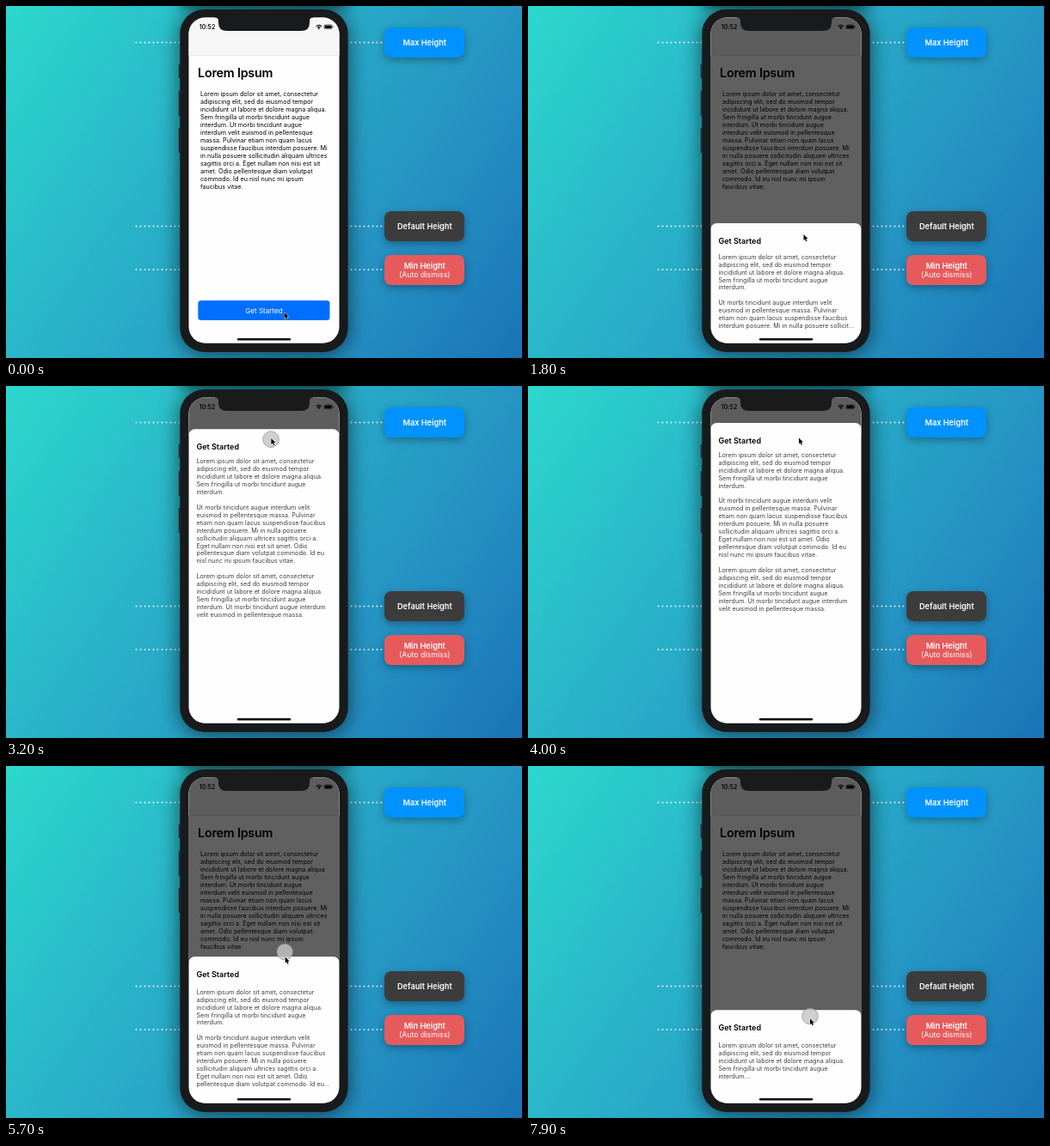
An HTML page with a canvas that plays this animation: 600x410 px, repeating every 8000 ms.

```html
<!DOCTYPE html>
<html lang="en">
<head>
<meta charset="utf-8">
<title>Bottom sheet demo</title>
<style>
  html, body { margin: 0; width: 100%; height: 100%; overflow: hidden; background: #26aec8; }
  canvas { display: block; width: 600px; height: 410px; }
</style>
</head>
<body>
<canvas id="stage"></canvas>
<script>
const W = 600, H = 410, LOOP = 8000;
const canvas = document.getElementById('stage');
const ctx = canvas.getContext('2d');
const dpr = window.devicePixelRatio || 1;
canvas.width = W * dpr;
canvas.height = H * dpr;

const SANS = 'Inter, Roboto, sans-serif';
const BODY = '7.2px ' + SANS;
const LINE = 8.95;
const SCREEN = { x: 212.5, y: 13.5, w: 175, h: 379.3, r: 19 };
const REST = 253;

const INTRO = `Lorem ipsum dolor sit amet, consectetur
adipiscing elit, sed do eiusmod tempor
incididunt ut labore et dolore magna aliqua.
Sem fringilla ut morbi tincidunt augue`.split('\n');

const PAGE = INTRO.concat(`interdum. Ut morbi tincidunt augue
interdum velit euismod in pellentesque
massa. Pulvinar etiam non quam lacus
suspendisse faucibus interdum posuere. Mi
in nulla posuere sollicitudin aliquam ultrices
sagittis orci a. Eget nullam non nisi est sit
amet. Odio pellentesque diam volutpat
commodo. Id eu nisl nunc mi ipsum
faucibus vitae.`.split('\n'));

const SHEET = INTRO.concat(`interdum.

Ut morbi tincidunt augue interdum velit
euismod in pellentesque massa. Pulvinar
etiam non quam lacus suspendisse faucibus
interdum posuere. Mi in nulla posuere
sollicitudin aliquam ultrices sagittis orci a.
Eget nullam non nisi est sit amet. Odio
pellentesque diam volutpat commodo. Id eu
nisl nunc mi ipsum faucibus vitae.
`.split('\n'), INTRO, `interdum. Ut morbi tincidunt augue interdum
velit euismod in pellentesque massa.`.split('\n'));

// Keyframes: [time, value], eased between neighbours.
const TOP = [[350, 412], [800, REST], [2371, REST], [3306, 43], [4980, 43], [5932, REST], [7500, REST], [8100, 295]];
const CURSOR_X = [[700, 323.5], [1500, 320.5], [2290, 320.5], [2800, 305.5], [3900, 315], [4900, 315], [5200, 317.5], [5970, 327.5], [7500, 327.5], [7900, 328]];
const CURSOR_Y = [[700, 357], [1500, 266], [2290, 266], [3225, 60.5], [4980, 60.5], [5970, 258.5], [7500, 258.5], [8100, 306.5]];
const DIM = [[350, 0], [800, 0.62]];
const PRESSES = [[150, 380], [2150, 3260], [4800, 5980], [7350, 8000]];

function at(keys, t) {
  if (t <= keys[0][0]) return keys[0][1];
  for (let i = 1; i < keys.length; i++) {
    const [t0, a] = keys[i - 1], [t1, b] = keys[i];
    if (t < t1) {
      const u = (t - t0) / (t1 - t0);
      return a + (b - a) * u * u * (3 - 2 * u);
    }
  }
  return keys[keys.length - 1][1];
}

function box(x, y, w, h, r, fill) {
  ctx.beginPath();
  ctx.roundRect(x, y, w, h, r);
  ctx.fillStyle = fill;
  ctx.fill();
}

function text(str, x, y, font, color, align = 'left', spacing = 0) {
  ctx.font = font;
  ctx.fillStyle = color;
  ctx.textAlign = align;
  ctx.letterSpacing = spacing + 'px';
  ctx.fillText(str, x, y);
  ctx.letterSpacing = '0px';
}

function shadow(color, blur, dy) {
  ctx.shadowColor = color;
  ctx.shadowBlur = blur * dpr;
  ctx.shadowOffsetY = dy * dpr;
}

function background() {
  const g = ctx.createLinearGradient(0, 0, W, H);
  g.addColorStop(0, '#2cd8cd');
  g.addColorStop(0.35, '#29b4c9');
  g.addColorStop(0.7, '#2594c4');
  g.addColorStop(1, '#1a74b6');
  ctx.fillStyle = g;
  ctx.fillRect(0, 0, W, H);
  ctx.fillStyle = 'rgba(255,255,255,0.9)';
  for (const y of [42.5, 256.5, 307]) {
    for (let x = 151.5; x < 438; x += 5) {
      ctx.beginPath();
      ctx.arc(x, y, 0.95, 0, 7);
      ctx.fill();
    }
  }
}

function labels() {
  const bold = '600 9.2px ' + SANS;
  for (const [y, color] of [[25, '#0092ff'], [239, '#3d3c3d'], [290, '#e75a5b']]) {
    ctx.save();
    shadow('rgba(0,0,0,0.32)', 10, 3);
    box(440, y, 93, 35, 8, color);
    ctx.restore();
  }
  text('Max Height', 486.7, 46, bold, '#fff', 'center');
  text('Default Height', 486.8, 260, bold, '#fff', 'center');
  text('Min Height', 486.7, 305.7, bold, '#fff', 'center');
  text('(Auto dismiss)', 486.8, 316.3, '8.8px ' + SANS, '#fff', 'center');
}

function phoneBody() {
  ctx.save();
  shadow('rgba(0,0,0,0.75)', 18, 2);
  box(202, -30, 196, 29, 12, '#181a1c');
  shadow('rgba(0,0,0,0.6)', 24, 3);
  box(202.3, 4, 195.3, 399, 28, '#181a1c');
  ctx.restore();
  for (const [y, h] of [[68, 16], [99, 29], [142, 29]])
    box(200.8, y, 1.8, h, 0.8, '#22282d');
}

function statusBar() {
  text('10:52', 224.8, 27, '600 7px ' + SANS, '#111');
  ctx.strokeStyle = '#111';
  ctx.lineWidth = 1.1;
  for (const r of [2.4, 4.4]) {
    ctx.beginPath();
    ctx.arc(363.8, 26.8, r, -Math.PI * 0.76, -Math.PI * 0.24);
    ctx.stroke();
  }
  ctx.beginPath();
  ctx.arc(363.8, 26.2, 0.9, 0, 7);
  ctx.fill();
  ctx.lineWidth = 0.5;
  ctx.beginPath();
  ctx.roundRect(369.8, 21.9, 9.6, 4.8, 1.4);
  ctx.stroke();
  box(370.5, 22.6, 8.2, 3.4, 0.8, '#111');
  box(379.9, 23.6, 0.7, 1.5, 0.3, '#111');
}

function page() {
  ctx.fillStyle = '#fefefe';
  ctx.fillRect(212, 13, 176, 380);
  ctx.fillStyle = '#f6f6f7';
  ctx.fillRect(212, 13, 176, 44.5);
  ctx.fillStyle = '#dededf';
  ctx.fillRect(212, 57.2, 176, 0.6);
  statusBar();
  text('Lorem Ipsum', 223, 83.2, '600 14.3px ' + SANS, '#000', 'left', -0.2);
  PAGE.forEach((s, i) => text(s, 226, 105 + i * 8.97, BODY, '#000'));
  box(223.3, 343, 153.2, 23, 3.5, '#006fff');
  text('Get Started', 300, 357.6, '8.1px ' + SANS, '#fff', 'center');
}

function truncate(n) {
  const lines = SHEET.slice(0, n);
  if (n >= SHEET.length) return lines;
  if (!lines[n - 1]) lines.pop();
  const last = lines.length - 1;
  const next = SHEET[last + 1];
  ctx.font = BODY;
  let s = lines[last] + (next ? ' ' + next : '');
  while (ctx.measureText(s + '…').width > 159) s = s.slice(0, -1);
  lines[last] = s.trimEnd() + '…';
  return lines;
}

function sheet(top, t) {
  // While being presented the sheet keeps its resting layout.
  const room = 379 - 32.6 - (t < 1000 ? REST : top);
  const n = Math.max(1, Math.min(SHEET.length, Math.floor(room / LINE)));
  const gap = n < SHEET.length ? (room - n * LINE) / 2 : 0;
  box(SCREEN.x, top, SCREEN.w, 420, 7, '#fefefe');
  text('Get Started', 221.5, top + 24, '600 9px ' + SANS, '#000');
  truncate(n).forEach((s, i) => text(s, 221.5, top + 32.6 + gap + 7.1 + i * LINE, BODY, '#404040'));
}

function notch() {
  ctx.fillStyle = '#181a1c';
  ctx.beginPath();
  ctx.moveTo(243, 12);
  ctx.lineTo(243, 13.5);
  ctx.quadraticCurveTo(247, 13.5, 247, 17.5);
  ctx.lineTo(247, 19.5);
  ctx.quadraticCurveTo(247, 29, 257, 29);
  ctx.lineTo(343, 29);
  ctx.quadraticCurveTo(353, 29, 353, 19.5);
  ctx.lineTo(353, 17.5);
  ctx.quadraticCurveTo(353, 13.5, 357, 13.5);
  ctx.lineTo(357, 12);
  ctx.fill();
}

function cursor(t) {
  if (PRESSES.some(([a, b]) => t >= a && t < b)) {
    ctx.beginPath();
    ctx.arc(at(CURSOR_X, t - 25), at(CURSOR_Y, t - 25), 9.4, 0, 7);
    ctx.fillStyle = 'rgba(196,196,196,0.82)';
    ctx.fill();
    ctx.strokeStyle = 'rgba(120,120,120,0.75)';
    ctx.lineWidth = 0.7;
    ctx.stroke();
  }
  ctx.save();
  ctx.translate(at(CURSOR_X, t), at(CURSOR_Y, t));
  ctx.beginPath();
  for (const [x, y] of [[0, 0], [0, 7], [1.6, 5.6], [2.7, 8.2], [3.9, 7.6], [2.8, 5.1], [4.9, 5]])
    ctx.lineTo(x, y);
  ctx.closePath();
  ctx.strokeStyle = 'rgba(255,255,255,0.9)';
  ctx.lineWidth = 1;
  ctx.stroke();
  ctx.fillStyle = '#000';
  ctx.fill();
  ctx.restore();
}

function draw(t) {
  ctx.setTransform(dpr, 0, 0, dpr, 0, 0);
  background();
  labels();
  phoneBody();
  ctx.save();
  ctx.beginPath();
  ctx.roundRect(SCREEN.x, SCREEN.y, SCREEN.w, SCREEN.h, SCREEN.r);
  ctx.clip();
  page();
  ctx.fillStyle = `rgba(0,0,0,${at(DIM, t)})`;
  ctx.fillRect(212, 13, 176, 380);
  const top = at(TOP, t);
  if (top < 400) sheet(top, t);
  box(268.8, 387, 62.4, 2.4, 1.2, '#0c0c0c');
  ctx.restore();
  notch();
  cursor(t);
}

const start = performance.now();
function tick() {
  draw((performance.now() - start) % LOOP);
  requestAnimationFrame(tick);
}
tick();
</script>
</body>
</html>
```
